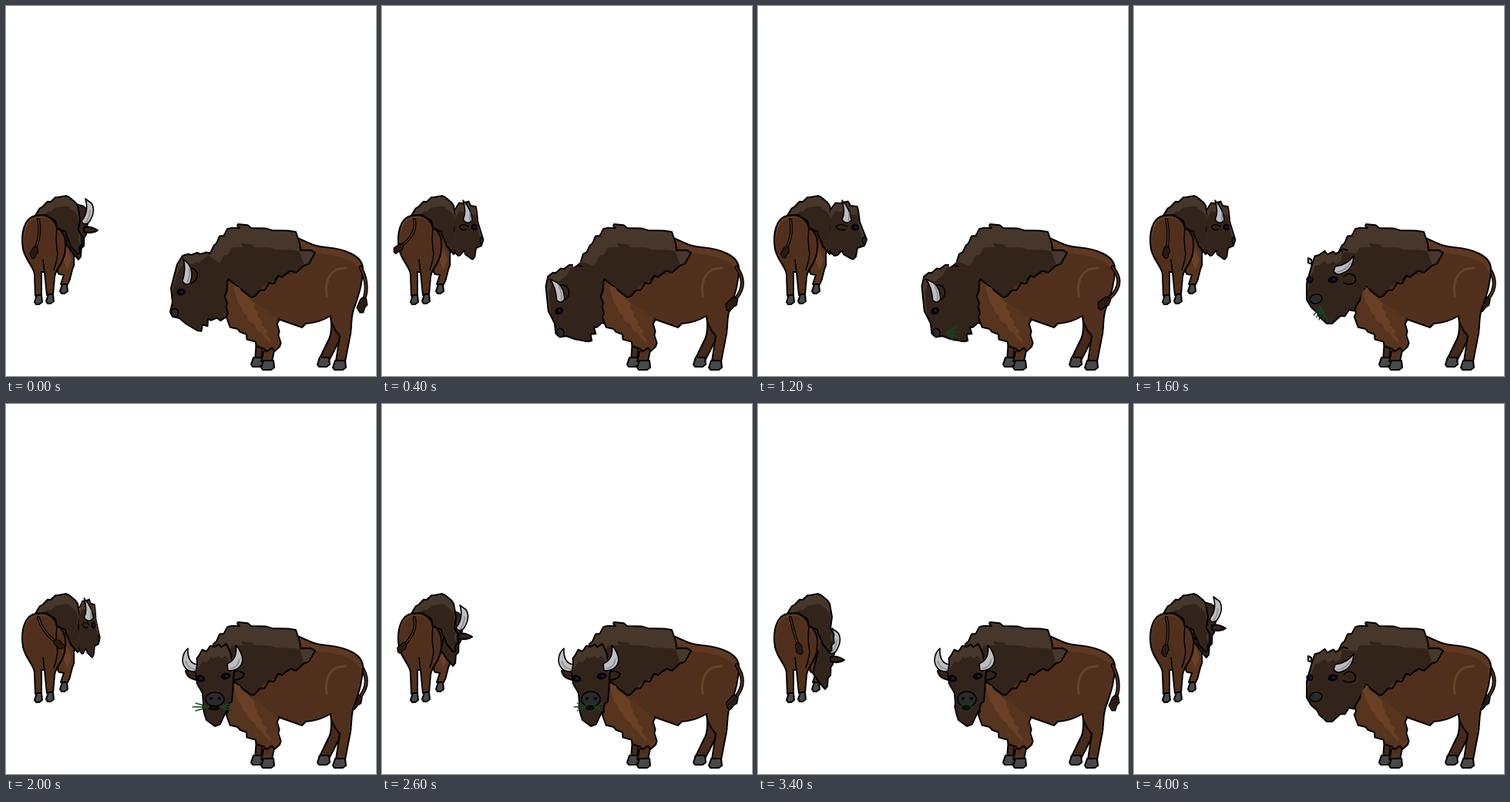
Recreate the animation shown at these times as an HTML page with a canvas. Size 480x480 px, loop 4200 ms.

```html
<!DOCTYPE html>
<html>
<head>
<meta charset="utf-8">
<style>
html, body { margin: 0; width: 100%; height: 100%; overflow: hidden; background: #fff; }
canvas { display: block; }
</style>
</head>
<body>
<canvas id="stage" width="480" height="480"></canvas>
<script>
const c = document.getElementById('stage').getContext('2d');
const HIDE = '#50301c', BACK = '#5e3921', SHADE = '#46291a', FUR = '#56341e', STREAK = '#693f25',
  MANE = '#33241b', TOP = '#47362a', HOOF = '#48484b', HORN = '#bdbdc0', NOSE = '#292a2d', GRASS = '#164522';
c.lineJoin = c.lineCap = 'round';

const path = d => new Path2D(d.replace(/^L/, 'M'));
function line(d, color = '#000', width = 1.6) {
  c.strokeStyle = color; c.lineWidth = width;
  c.stroke(path(d));
}
function shape(d, fill, width = 2) {
  c.fillStyle = fill; c.fill(path(d));
  if (width) line(d, '#000', width);
}
// A shape whose upper edge is lit: the base colour is laid over it, shifted
function lit(d, base, light, dx, dy, width = 2) {
  const p = path(d);
  c.save();
  c.clip(p);
  c.fillStyle = light; c.fill(p);
  c.translate(dx, dy);
  c.fillStyle = base; c.fill(p);
  c.restore();
  line(d, '#000', width);
}
// A clockwise outline through a few points, broken into hairy teeth
function hair(points, step, tooth) {
  const p = points.split(' ').map(Number);
  let d = `L${p[0]} ${p[1]}`;
  for (let i = 2; i < p.length; i += 2) {
    const [x, y, dx, dy] = [p[i - 2], p[i - 1], p[i] - p[i - 2], p[i + 1] - p[i - 1]];
    const len = Math.hypot(dx, dy), n = Math.max(1, Math.round(len / step));
    for (let k = 1; k <= n; k++) {
      const t = (k - .3) / n, h = tooth * (.8 + .4 * Math.sin(i * 7 + k * 5)) / len;
      d += `L${x + dx * t + dy * h} ${y + dy * t - dx * h}L${x + dx * k / n} ${y + dy * k / n}`;
    }
  }
  return d;
}
function oval(x, y, rx, ry, fill, stroke = '#000', turn = 0) {
  c.beginPath();
  c.ellipse(x, y, rx, ry, turn, 0, 7);
  c.fillStyle = fill; c.fill();
  if (stroke) { c.strokeStyle = stroke; c.lineWidth = 1.5; c.stroke(); }
}
function eye(x, y, rx = 5, turn = 0) {
  oval(x, y, rx, 3.6, '#080512', '#000', turn);
  oval(x + 1, y, 1.8, 1.6, '#2c1c50', null);
}
function horn(d, shade) {
  shape(d, HORN, 1.6);
  line(shade, '#8a8a8e');
}
function hoof(x, y, w) {
  shape(`M${x + 3} ${y}L${x} ${y + 9} ${x + 2} ${y + 12} ${x + w - 4} ${y + 12} ${x + w} ${y + 9} ${x + w - 1} ${y}Z`, HOOF);
}
function grass(n, x, y, dx, dy, spread) {
  for (let i = 0; i < n; i++) {
    const s = (i - (n - 1) / 2) * spread;
    line(`M${x} ${y}L${x + dx + (dy ? s : -i % 2 * 4)} ${y + dy + (dy ? i % 3 * 3 : s)}`, GRASS, 1.4);
  }
}
function moved(draw, x, y, turn = 0, sx = 1, px = 0, py = 0) {
  c.save();
  c.translate(x, y); c.rotate(turn); c.scale(sx, 1); c.translate(-px, -py);
  draw();
  c.restore();
}
// A curved tail ending in a ragged tuft
function tail(bx, by, cx, cy, x, y, size) {
  const d = `M${bx} ${by}Q${cx} ${cy} ${x} ${y}`;
  line(d, '#000', 5.6 * size);
  line(d, HIDE, 2.4 * size);
  moved(() => {
    c.scale(size, size);
    shape(hair('0 -3 12 -5 22 0 12 6 0 3', 9, 3) + 'Z', '#291a12', 1.4);
  }, x, y, Math.atan2(y - cy, x - cx));
}

// ---- near bison ----
function nearBody() {
  shape('M421 398Q424 425 418 434L406 459 419 460 433 433 436 400', SHADE);
  hoof(404, 456, 16);
  shape('M318 420L325 434 323 460 331 460 334 430', SHADE);
  hoof(318, 456, 15);
  lit('M376 300C395 308 400 312 415 313 440 315 462 324 463 340 463 360 457 376 453 388 447 400 449 411 447 425L440 461 428 461 433 428Q421 414 421 402 406 411 389 412L384 417 367 411 350 405 330 350Z', HIDE, BACK, -2, 9);
  line('M416 376C413 354 421 340 441 340', '#68432a', 3);
  hoof(424, 460, 17);
}
function nearMane() {
  lit(hair('258 331 273 308 292 288', 14, 3) + hair('303 288 301 283 318 288 345 291 376 293 382 317 401 320', 30, 2)
    + hair('401 320 386 337 353 350 318 378', 17, 4) + 'L290 355 292 398 265 360', MANE, TOP, 5, 25);
}
function nearFur() {
  shape('M330 430L335 445 331 461 345 461 349 442', HIDE);
  hoof(331, 460, 17);
  const edge = hair('350 397 355 442 335 445 312 426 289 412 286 372', 13, 4) + 'L288 354 318 378';
  shape(edge, FUR);
  shape('M318 380L336 362 366 347 366 408 350 404Z', HIDE, 0);
  shape(hair('294 361 317 381 326 402 343 438 313 402 300 382', 14, 3), STREAK, 0);
  line(hair('366 345 353 350 318 378', 17, 4), '#000', 2);
}
function neck(k) {
  const x = 264 - 24 * k, y = 321 + 29 * k;
  shape(`M258 331L${x} ${y} 250 375 280 405 296 400 310 350Z`, MANE, 0);
  line(hair(`${x} ${y} 259 ${331 + 10 * k}`, 12, 3), '#000', 2);
}
function sideHead() {
  lit(hair('286 403 262 406 248 421', 11, 5) + 'L233 412 225 405 216 403 213 397 216 384 214 366 222 335 229 324'
    + hair('229 324 240 323 264 321', 12, 2), MANE, TOP, 0, 12);
  shape('M262 323L300 350 292 402 260 390 245 337Z', MANE, 0);
  horn('M229 357Q233 364 239 359 244 345 237 335L230 328Q234 340 229 357Z', 'M238 341Q239 351 235 358');
  line('M241 340Q251 344 247 354 244 359 239 360');
  eye(227, 371, 5, -.15);
  oval(219, 398, 4.5, 5.5, NOSE);
}
function quarterHead(fed) {
  shape('M231 335L226 333 226 327 230 329Z', HORN);
  lit(hair('299 355 290 386 268 402 250 412 238 398', 15, 4) + 'L230 391 224 381 224 360 231 335'
    + hair('231 335 240 323 262 322 277 317', 13, 4), MANE, TOP, 0, 13);
  shape('M270 318L295 322 303 358 291 382 265 370Z', MANE, 0);
  line('M272 351Q279 344 286 350 289 355 286 359 279 363 272 359');
  horn('M259 344Q263 351 272 346 284 341 285 324 277 336 261 338Z', 'M264 345Q275 343 281 333');
  eye(228, 355, 4, .25);
  eye(258, 355, 6, -.2);
  oval(236, 380, 8, 6, NOSE, '#000', -.2);
  if (fed) grass(6, 242, 390, 0, 11, 3.5);
}
function frontHead(blade, open) {
  shape('M247 347Q238 344 233 346 235 357 249 358M294 347Q304 345 309 350 307 358 295 358', MANE);
  lit('M246 347' + hair('246 347 250 327 270 315 288 316 296 344', 12, 4)
    + hair('294 376 284 402 271 418 258 404 256 388', 14, 3) + 'L255 375 248 363Z', MANE, TOP, 0, 15);
  horn('M246 347Q231 348 229 333 229 323 236 317 235 336 248 338Z', 'M233 334Q237 344 246 344');
  horn('M288 346Q305 346 307 332 306 321 298 313 301 331 287 337Z', 'M303 331Q301 342 291 343');
  eye(252, 356, 5.5, .25);
  eye(285, 353, 5.5, -.2);
  oval(271, 383, 12, open ? 10 : 9, NOSE);
  for (const x of [266, 277]) oval(x, 382, 2.4, 1.8, '#09090a', null);
  oval(270, 394, 7, open ? 4.5 : 2.5, '#120c0a', open ? GRASS : '#000');
  if (blade > 0) for (const s of [-1, 1]) grass(3, 270 + s * 7, 393, s * blade, 0, 5);
}

// ---- far bison ----
function farBody() {
  shape(hair('66 288 82 296 88 322 86 342 80 361', 14, 2) + 'L71 361 75 349' + hair('75 349 67 345 74 326', 12, 2), FUR);
  shape('M76 307L85 329 80 343 73 327Z', STREAK, 0);
  hoof(70, 361, 10);
}
function farRump() {
  lit('M38 272C49 268 64 276 66 288 77 292 79 308 76 322 73 336 64 341 63 352L61 375 53 375 50 345 46 345 46 376 38 376 37 348C36 338 25 330 22 315 19 296 23 275 38 272Z', HIDE, BACK, 2, 4);
  line('M48 329L50 346M66 288Q64 305 67 322 65 335 62 342', '#000', 1.5);
  hoof(37, 375, 10);
  hoof(52, 374, 10);
}
function farMane() {
  lit(hair('38 272 48 260 68 248 82 248 93 259', 14, 2) + 'L96 276 94 291'
    + hair('94 291 98 303 93 322 82 306 77 293', 13, 2) + 'L66 288 64 279 52 271Z', MANE, TOP, 0, 13);
}
function awayHead() {
  shape(hair('90 257 104 263 105 286 94 329', 16, 2) + 'L87 321 78 308 85 280', MANE);
  shape('M101 287Q110 285 119 291 112 296 101 293Z', MANE);
  horn('M98 279Q101 286 108 280 117 266 111 256L103 250Q108 267 98 279Z', 'M109 265Q108 276 103 281');
}
function turnedHead(s) {
  moved(() => {
    lit(hair('94 264 106 256 120 259 130 265', 12, 4) + 'L132 280 141 303 138 311 129 314 127 325'
      + hair('127 325 121 328 109 317 99 324 93 317', 14, 2), MANE, TOP, 0, 11);
    line('M116 286Q106 281 101 286 104 292 113 290');
    eye(126, 287, 4.5, .2);
    oval(138, 304, 2.4, 4, NOSE);
  }, 97, 0, 0, s, 97);
  moved(() => horn('M109 277Q114 285 121 278 120 264 109 252 114 268 109 277Z', 'M118 268L118 278'), -18 * (1 - s), 0);
}

// ---- motion: eased between a few [step, value] keys ----
function at(n, ...keys) {
  const i = keys.findIndex(k => k[0] > n);
  if (i < 1) return keys[i ? keys.length - 1 : 0][1];
  const [[a, u], [b, v]] = [keys[i - 1], keys[i]];
  return u + (v - u) * (n - a) / (b - a);
}
const STEP = 200, COUNT = 21;

function draw(n) {
  c.fillStyle = '#fff';
  c.fillRect(0, 0, 480, 480);

  farBody();
  const away = n < 1 || n > 11;
  const sink = at(n, [12, 0], [13, 11], [17, 41], [19, 0]);
  if (away) moved(awayHead, -sink * .17, sink);
  farRump();
  farMane();
  if (!away) turnedHead(at(n, [1, .57], [3, 1], [6, 1], [10, .57]));
  const fx = at(n, [0, 39], [3, 21], [4, 33], [8, 43], [10, 63], [14, 20], [17, 51], [21, 39]);
  tail(42, 277, 46, 294, fx, 313 - Math.abs(fx - 40) * .25, .7);

  const nx = at(n, [0, 465], [4, 454], [5, 454], [8, 460], [13, 460], [17, 465], [20, 460], [21, 465]);
  const nearTail = () => tail(460, 339, 471 + (465 - nx) * .7, 360, nx, 379, .9);
  const hidden = n > 7 && n < 13 || n > 18;
  if (hidden) nearTail();
  nearBody();
  nearMane();
  if (n < 8) {
    const k = at(n, [0, 0], [3, 1], [5, 1], [8, 0]);
    neck(k);
    moved(() => {
      sideHead();
    }, 227 + 4 * k, 371 + 37 * k, -.53 * k, 1, 227, 371);
    if (n > 2) grass(6, 227 + 25 * k, 405 + 29 * k, 15, 0, 4);
  }
  nearFur();
  if (n === 8 || n === 9 || n > 18) quarterHead(n < 10);
  else if (n > 9) frontHead(at(n, [10, 17], [17, 0]), n > 10 && n % 2);
  if (!hidden) nearTail();
}

let shown = -1;
function tick() {
  const n = Math.floor(performance.now() / STEP) % COUNT;
  if (n !== shown) draw(shown = n);
  requestAnimationFrame(tick);
}
tick();
</script>
</body>
</html>
```
